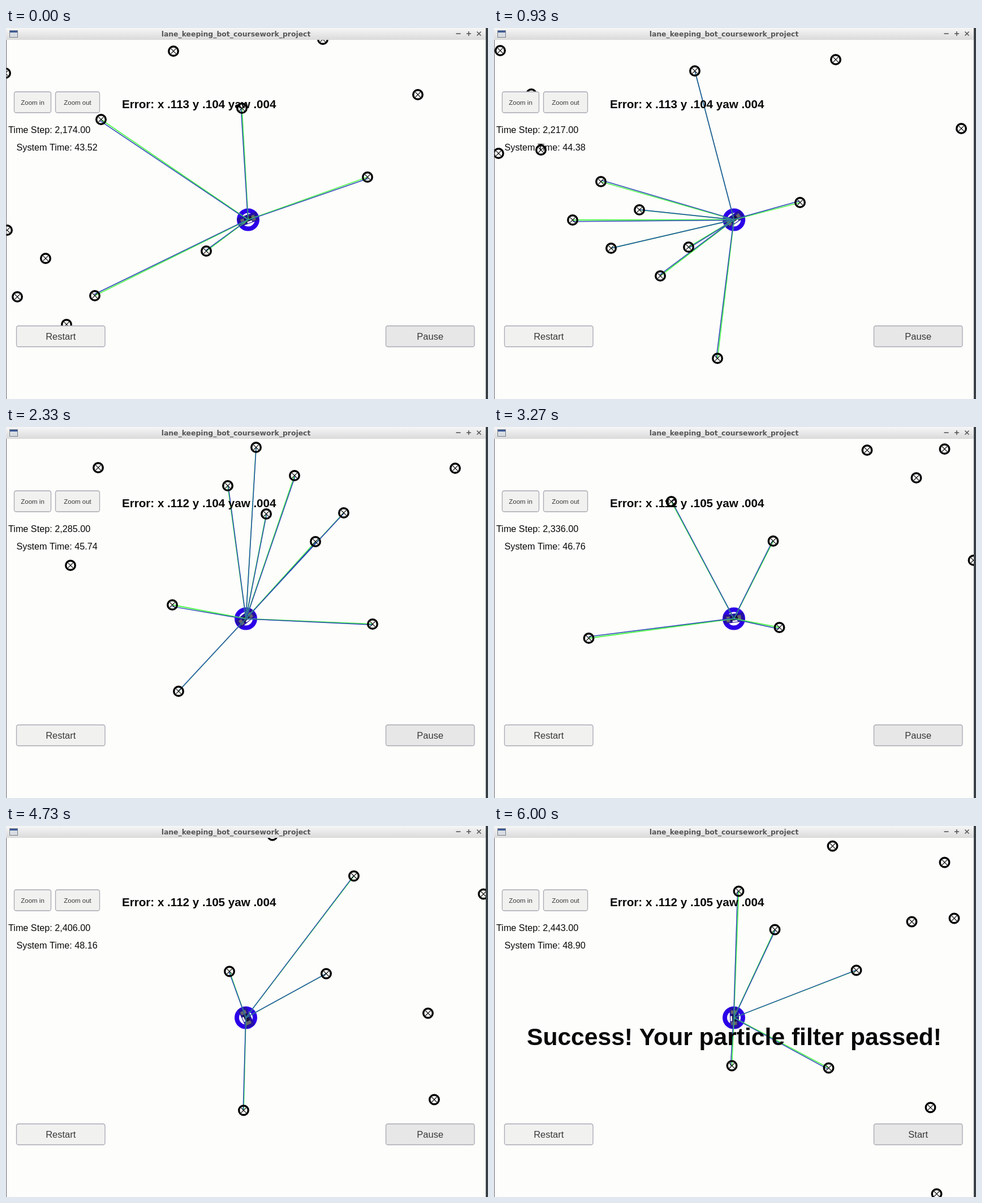
Write an HTML page with a canvas that moves like this. It is 852 by 657 pixels and loops after 6.07 s.

```html
<!DOCTYPE html>
<html lang="en">
<head>
<meta charset="utf-8">
<title>Particle filter</title>
<style>
html, body { margin: 0; width: 100%; height: 100%; overflow: hidden; background: #fdfdfb; }
canvas { display: block; }
</style>
</head>
<body>
<canvas id="stage" width="852" height="657"></canvas>
<script>
const ctx = document.getElementById('stage').getContext('2d');
const LOOP = 6070, TICK = 200 / 3, SENSOR_RANGE = 321, LAST_STEP = 2443;
const SANS = '"Liberation Sans", Arial, sans-serif';
const INK = '#080808';

// Landmarks on the map, in pixels of the opening view
const landmarks = [
  [296, 41], [560, 20], [-1, 80], [728, 118], [417, 142], [168, 162], [639, 264], [354, 395],
  [157, 474], [107, 525], [-104, 302], [-121, 203], [-179, 308], [-176, 126], [208, 671], [-277, 394],
  [-146, 637], [-135, 790], [-326, 567], [-472, 809], [-421, 322], [-497, 563], [-485, 254], [-319, 174]
];
// One block of the map is a tilted square
for (const i of [0, 1])
  for (const j of [0, 1]) landmarks.push([2 + 68 * i - 50 * j, 358 + 50 * i + 68 * j]);

// Waypoints of the drive; the curve between them is a spline over the time step
const route = [
  { tick: 0, step: 2174, x: 0, y: 0 },
  { tick: 14, step: 2217, x: 187, y: -86 },
  { tick: 23, step: 2247, x: 302, y: -184 },
  { tick: 35, step: 2285, x: 440, y: -322 },
  { tick: 49, step: 2336, x: 639.5, y: -435 },
  { tick: 71, step: 2406, x: 892, y: -305.5 },
  { tick: 82, step: LAST_STEP, x: 917.5, y: -138.5 }
];

const noise = k => { const v = Math.sin(k * 12.9898) * 43758.5453; return v - Math.floor(v); };
const mix = (a, b, u) => a + (b - a) * u;

const chord = (i, axis) =>
  (route[i + 1][axis] - route[i][axis]) / (route[i + 1].step - route[i].step);

function slope(i, axis) {
  const last = route.length - 1;
  if (i === 0) return 1.5 * chord(0, axis) - 0.5 * slope(1, axis);
  if (i === last) return 1.5 * chord(last - 1, axis) - 0.5 * slope(last - 1, axis);
  const [a, b, c] = [i - 1, i, i + 1].map(k => route[k].step);
  return mix(chord(i - 1, axis), chord(i, axis), (b - a) / (c - a));
}

// Position and speed along one axis at a time step inside leg i
function follow(i, axis, step) {
  const from = route[i], to = route[i + 1], span = to.step - from.step;
  const u = (step - from.step) / span, m = chord(i, axis);
  const p = slope(i, axis), q = slope(i + 1, axis), bend = p + q - 2 * m;
  return {
    at: from[axis] + span * u * (p + u * (m - p - bend + u * bend)),
    speed: p + u * (2 * (m - p - bend) + 3 * u * bend)
  };
}

function poseAt(tick) {
  let i = 0;
  while (i < route.length - 2 && tick >= route[i + 1].tick) i++;
  const from = route[i], to = route[i + 1];
  const progress = Math.min(1, (tick - from.tick) / (to.tick - from.tick));
  const step = Math.round(mix(from.step, to.step, progress));
  const x = follow(i, 'x', step), y = follow(i, 'y', step);
  return { step, x: x.at, y: y.at, angle: Math.atan2(y.speed, x.speed) };
}

function line(x0, y0, x1, y1, color, width) {
  ctx.strokeStyle = color;
  ctx.lineWidth = width;
  ctx.beginPath();
  ctx.moveTo(x0, y0);
  ctx.lineTo(x1, y1);
  ctx.stroke();
}

function cross(x, y, r, color, width) {
  line(x - r, y - r, x + r, y + r, color, width);
  line(x - r, y + r, x + r, y - r, color, width);
}

function ring(x, y, r, color, width) {
  ctx.strokeStyle = color;
  ctx.lineWidth = width;
  ctx.beginPath();
  ctx.arc(x, y, r, 0, 2 * Math.PI);
  ctx.stroke();
}

function rect(x, y, w, h, color) {
  ctx.fillStyle = color;
  ctx.fillRect(x, y, w, h);
}

function text(str, x, y, font, color = INK, align = 'left') {
  ctx.font = font;
  ctx.fillStyle = color;
  ctx.textAlign = align;
  ctx.fillText(str, x, y);
}

function button(label, x, y, w, size, fill = '#f1f1f0') {
  ctx.fillStyle = fill;
  ctx.strokeStyle = '#a8a8b2';
  ctx.lineWidth = 1.3;
  ctx.beginPath();
  ctx.roundRect(x, y, w, 37, 3.5);
  ctx.fill();
  ctx.stroke();
  text(label, x + w / 2, y + 18.5 + size * 0.36, `${size}px ${SANS}`, '#383838', 'center');
}

function landmark(x, y) {
  ring(x, y, 8.3, '#000', 3.4);
  cross(x, y, 4.5, '#111', 1.1);
}

function car(x, y, angle) {
  ring(x, y, 16, '#2c00e8', 8);
  ctx.save();
  ctx.translate(x, y);
  ctx.rotate(angle);
  rect(-18, -9, 36, 16, '#2411a0');
  rect(-6, -5, 13, 9, '#17133f');
  for (const side of [-10, 10]) rect(side - 3, -5, 6, 10, '#66666c');
  rect(-3, 3, 9, 3, '#e8e8f4');
  ctx.restore();
}

// True range in green, the noisy measurement beside it in blue
function beam(cx, cy, x, y, seed) {
  const dist = Math.hypot(x - cx, y - cy), miss = 6 * noise(seed) - 3;
  const nx = (cy - y) / dist, ny = (x - cx) / dist;
  line(cx, cy, x, y, '#4cf84c', 1.8);
  line(cx + nx * miss / 4, cy + ny * miss / 4, x + nx * miss, y + ny * miss, '#2848b4', 1.5);
}

function windowFrame() {
  const bar = ctx.createLinearGradient(0, 0, 0, 21);
  bar.addColorStop(0, '#f6f6f6');
  bar.addColorStop(1, '#dadada');
  rect(0, 0, 848, 21, bar);
  rect(0, 21, 1, 636, '#66666a');
  rect(848, 0, 4, 657, '#3a4146');
  rect(6, 4, 15, 13, '#77808c');
  rect(7, 5, 13, 3, '#3d5a98');
  rect(7, 8, 13, 8, '#d9dde2');
  text('lane_keeping_bot_coursework_project', 406.5, 14.5,
    'bold 12.4px "DejaVu Sans", sans-serif', '#565656', 'center');
  for (const x of [799.5, 818]) line(x - 4, 10, x + 4, 10, '#555', 1.6);
  line(818, 6, 818, 14, '#555', 1.6);
  cross(836, 10, 3.5, '#555', 1.6);
}

function hud(step) {
  const done = step === LAST_STEP;
  const errX = step < 2232 ? '.113' : '.112', errY = step < 2310 ? '.104' : '.105';
  button('Zoom in', 14.5, 113, 65, 11.5);
  button('Zoom out', 87.5, 113, 78, 11.5);
  button('Restart', 18.5, 527.5, 156.5, 16.5);
  button(done ? 'Start' : 'Pause', 671.5, 527.5, 156.5, 16.5, '#e7e7e7');
  text(`Error: x ${errX} y ${errY} yaw .004`, 205, 141.5, `bold 20.6px ${SANS}`);
  text(`Time Step: ${step.toLocaleString('en-US')}.00`, 4, 186, `16.2px ${SANS}`);
  text(`System Time: ${((step + 2) / 50).toFixed(2)}`, 18.5, 217, `16.2px ${SANS}`);
  if (done) text('Success! Your particle filter passed!', 424.5, 388, `bold 42.6px ${SANS}`, INK, 'center');
}

function render(now) {
  const tick = Math.floor((now % LOOP + 4) / TICK);
  const { step, x, y, angle } = poseAt(tick);
  const cx = 424 + 4 * Math.exp(-tick / 5), cy = 339.5;
  const visible = landmarks.map(([lx, ly]) => [lx + x, ly + y]);

  rect(0, 0, 852, 657, '#fdfdfb');
  car(cx, cy, angle);
  visible.forEach(([lx, ly], i) => {
    if (Math.hypot(lx - cx, ly - cy) < SENSOR_RANGE) beam(cx, cy, lx, ly, step + i * 7.3);
  });
  visible.forEach(([lx, ly]) => landmark(lx, ly));
  hud(step);
  windowFrame();
  requestAnimationFrame(render);
}
requestAnimationFrame(render);
</script>
</body>
</html>
```
